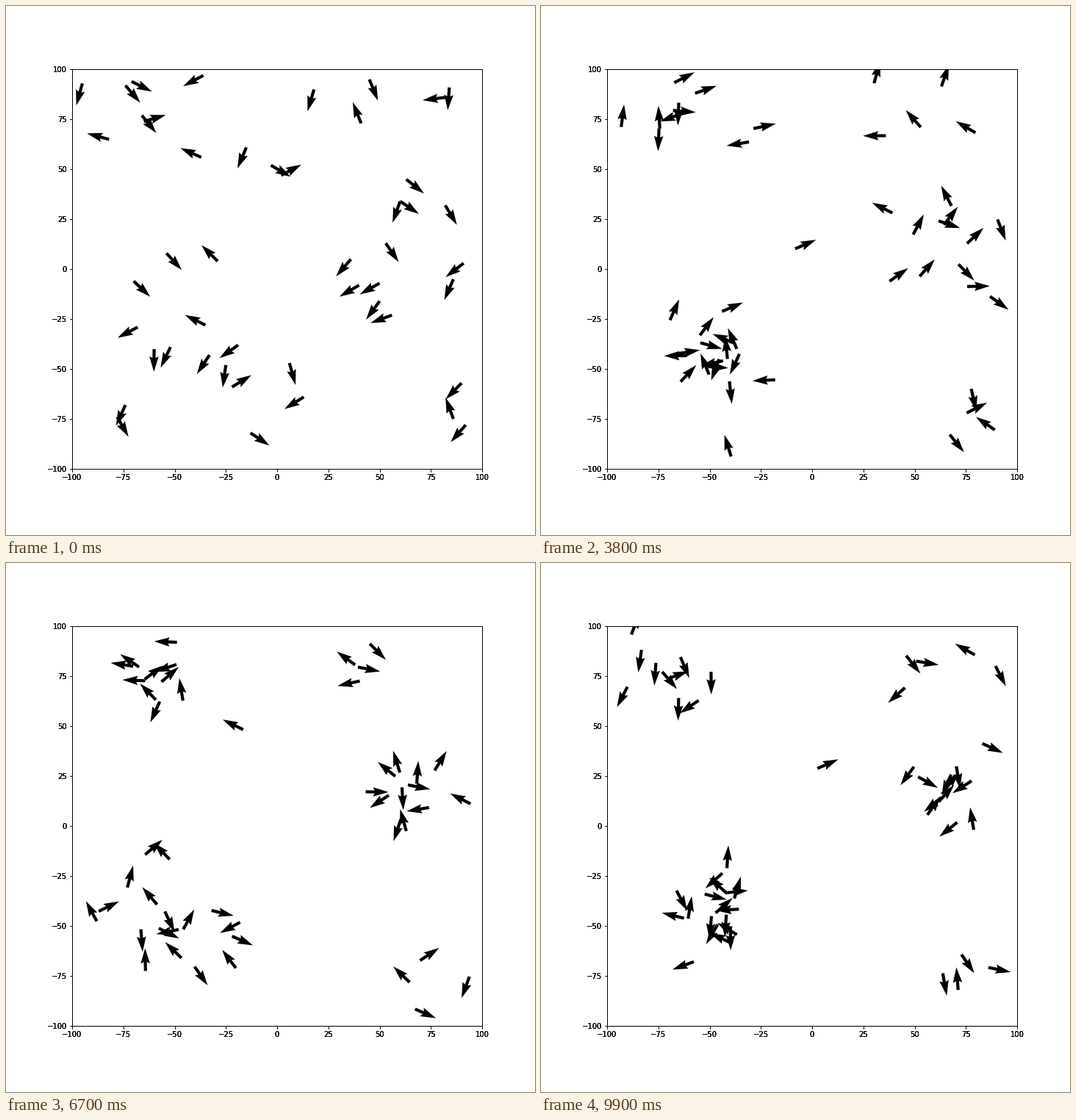
A matplotlib script for the animation above (10000 ms loop, 720x720 px).

```python
import numpy as np
import matplotlib.pyplot as plt
from matplotlib.animation import FuncAnimation

FRAMES, INTERVAL = 100, 100
SPEED, TURN, JITTER = 1.6, 0.25, 0.22

# Each flock: home x, home y, loose radius, and where its birds start.
FLOCKS = [
    (-62, 74, 22, [(-95, 93), (-71, 94), (-74, 92), (-66, 77), (-65, 74),
                   (-82, 65), (-36, 97), (-37, 56), (-15, 61), (-3, 52)]),
    (46, 80, 15, [(18, 90), (45, 95), (41, 73), (84, 91), (82, 86)]),
    (-4, 27, 8, [(2, 47)]),
    (65, 16, 19, [(63, 45), (60, 34), (60, 34), (82, 32), (53, 13), (36, 5),
                  (91, 3), (86, -5), (50, -7), (40, -8), (50, -16),
                  (56, -23)]),
    (-47, -44, 28, [(-54, 8), (-29, 4), (-70, -6), (-68, -29), (-100, -33),
                    (-35, -28), (-52, -39), (-33, -43), (-60, -40),
                    (-19, -38), (-25, -48), (-22, -59), (6, -47), (13, -64),
                    (-13, -82), (-74, -68), (-78, -74), (-29, -111)]),
    (79, -77, 13, [(90, -57), (86, -75), (92, -78), (108, -80)]),
]


def simulate():
    """Each bird wanders at constant speed and turns back to its home."""
    rng = np.random.default_rng(12)
    pos = np.array([p for f in FLOCKS for p in f[3]], float)
    home = np.array([f[:3] for f in FLOCKS for _ in f[3]], float)
    angle = np.radians(rng.normal(255, 75, len(pos)))
    states = []
    for _ in range(FRAMES):
        states.append((pos.copy(), angle.copy()))
        pos += SPEED * np.column_stack([np.cos(angle), np.sin(angle)])
        dx, dy = (home[:, :2] - pos).T
        pull = np.minimum(1, np.hypot(dx, dy) / home[:, 2])
        angle += TURN * pull * np.sin(np.arctan2(dy, dx) - angle)
        angle += rng.normal(0, JITTER, len(angle))
    return states


def make_axes(fig):
    ax = fig.add_axes([0.125, 0.125, 0.775, 0.755], facecolor="none")
    ticks = np.arange(-100, 101, 25)
    ax.set(xlim=(-100, 100), ylim=(-100, 100), xticks=ticks, yticks=ticks)
    ax.tick_params(labelsize=10)
    return ax


plt.rcParams["font.family"] = "DejaVu Sans"
fig = plt.figure(figsize=(10, 10), dpi=72, facecolor="white")

# Stacked axes give the heavy, overprinted tick labels.
ax = [make_axes(fig) for _ in range(3)][0]

states = simulate()
pos, angle = states[0]
birds = ax.quiver(pos[:, 0], pos[:, 1], np.cos(angle), np.sin(angle),
                  color="black", scale=18, width=0.0075)


def update(i):
    pos, angle = states[i]
    birds.set_offsets(pos)
    birds.set_UVC(np.cos(angle), np.sin(angle))
    return (birds,)


anim = FuncAnimation(fig, update, frames=FRAMES, interval=INTERVAL,
                     repeat=True, repeat_delay=0)
plt.show()
```
